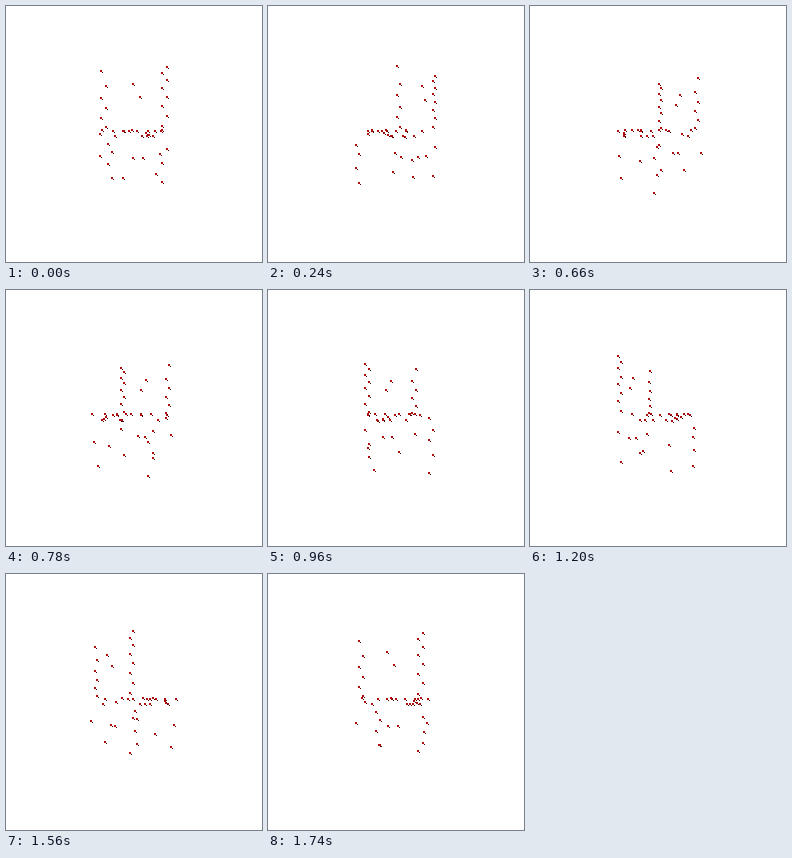
Write a matplotlib script that moves like this. It is 256 px wide and 256 px high and loops after 1.8 s.

```python
import numpy as np
import matplotlib.pyplot as plt
from matplotlib.animation import FuncAnimation

SIZE = 256
FRAMES = 30
INTERVAL = 60
FOCAL = SIZE / 2 / np.tan(np.radians(30))  # 60 degree lens

# Chair frame: x right, y down, z towards the viewer.
HALF = 27
SEAT, UNDER = -3.4, 2.2


def bar(a, b, n=2, power=1):
    """n points from a to b, spaced by a power ease."""
    t = np.linspace(0, 1, n)[:, None] ** power
    return np.array(a) + t * (np.array(b) - np.array(a))


def post(side, depth, top, bottom, n, power=1):
    """Points down a corner post, alternating between its two faces."""
    x, z = side * HALF, depth * HALF
    points = bar((x, top, z), (x, bottom, z), n, power)
    points[:, 0] += side * 2 * (-1.0) ** np.arange(n)
    return points


cloud = np.vstack([
    # back posts and legs
    post(1, 1, -58.6, -7.1, 8, 1.2),
    post(-1, 1, -55.6, -5.8, 6, 0.8),
    post(1, 1, 13, 42.4, 2),
    post(-1, -1, 11, 49.3, 4, 1.3),
    post(1, -1, 22.5, 44.6, 2),
    # slats and braces
    bar((-1, -42.8, 32), (5, -31.7, 31)),
    bar((-1, 21, 28), (8, 21, 30)),
    bar((-29, 18.8, 32), (-9.6, 38.2, 28.5)),
    bar((28, 29, -1), (28, 29, -1), 1),
    # seat: front, rear and middle rows
    bar((-11, SEAT, -30), (30.4, SEAT, -28), 5, 1.5),
    bar((-29.8, SEAT, 15), (26.3, SEAT, 13), 3),
    bar((-22, SEAT, -10.5), (21.5, SEAT, -5), 3, 2),
    # underside
    bar((18.3, UNDER, 9), (8.8, UNDER, -14), 3),
    bar((21.2, UNDER, -26.5), (13.7, -1, -31), 3),
    bar((-16.8, UNDER, 26), (-34.2, 0, -3)),
])


def project(angle):
    x, y, z = cloud.T
    c, s = np.cos(angle), np.sin(angle)
    scale = FOCAL / (FOCAL - (z * c - x * s))
    return SIZE / 2 + (x * c + z * s) * scale, SIZE / 2 + y * scale


fig = plt.figure(figsize=(SIZE / 100, SIZE / 100), dpi=100, facecolor="white")
ax = fig.add_axes([0, 0, 1, 1])
ax.set(xlim=(0, SIZE), ylim=(SIZE, 0))
ax.axis("off")


def pixels(size, color):
    line, = ax.plot([], [], "s", ms=size * 72 / fig.dpi, mew=0,
                    color=color, antialiased=False)
    return line


dots = pixels(2, "#b00c0c")
shades = pixels(1, "#4a0606")


def draw(i):
    x, y = np.round(project(2 * np.pi * i / FRAMES))
    dots.set_data(x, y)
    shades.set_data(x + 0.5, y + 0.5)
    return dots, shades


anim = FuncAnimation(fig, draw, frames=FRAMES, interval=INTERVAL,
                     blit=False, repeat=True, repeat_delay=0)
plt.show()
```
